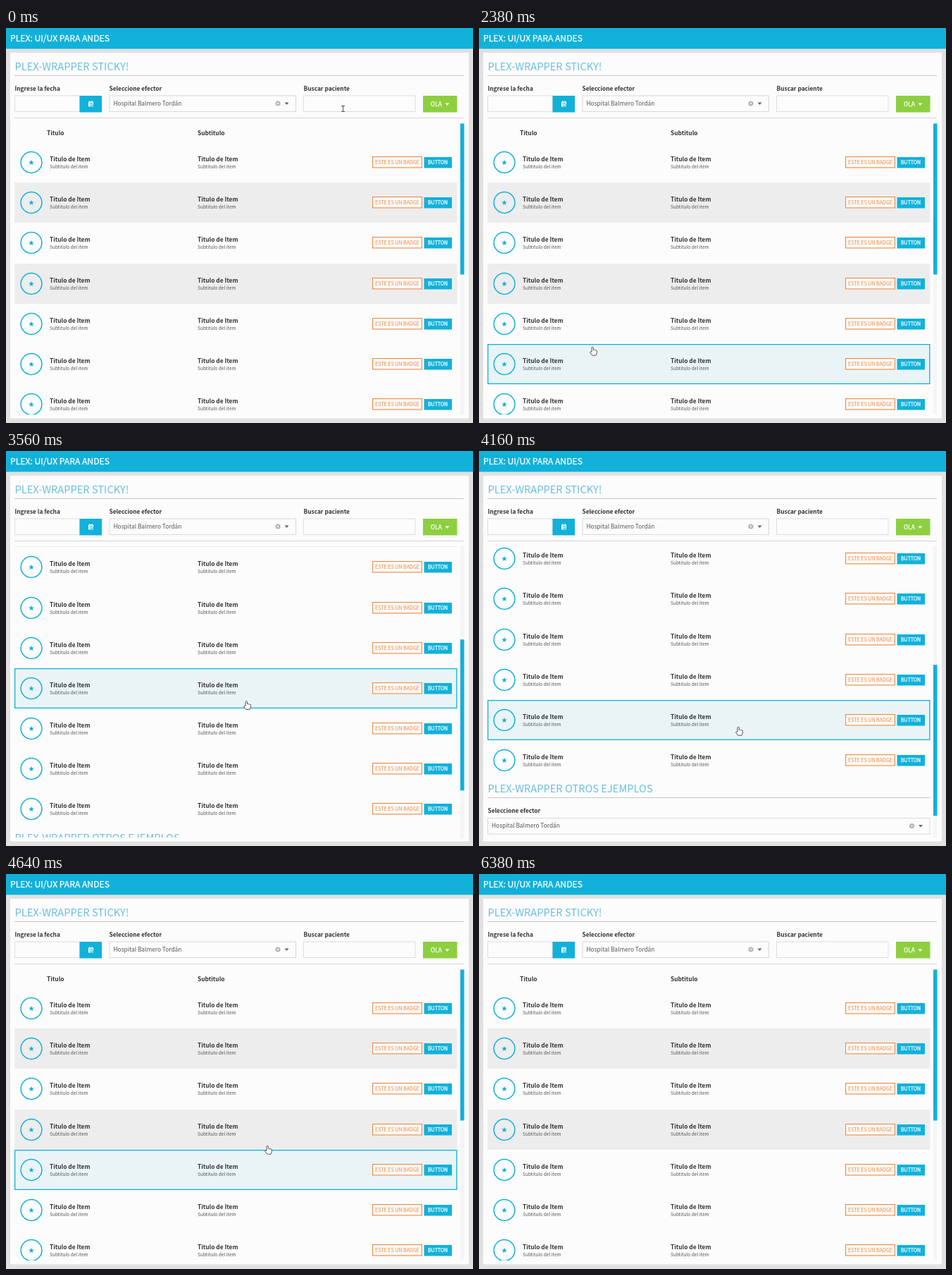
Write an HTML page with a canvas that moves like this. It is 663 by 560 pixels and loops after 6700 ms.

```html
<!DOCTYPE html>
<html lang="es">
<head>
<meta charset="utf-8">
<title>Plex wrapper</title>
<style>
html, body { margin: 0; width: 100%; height: 100%; overflow: hidden; background: #e1e1e1; }
canvas { display: block; width: 663px; height: 560px; }
</style>
</head>
<body>
<canvas id="stage"></canvas>
<script>
const W = 663, H = 560, LOOP = 6700;
const BLUE = '#11b1da', INK = '#333', GREY = '#555', ORANGE = '#e98a45', PANEL = '#fcfcfc';
const FAMILY = '"Noto Sans CJK JP", "Noto Sans CJK SC", "Noto Sans CJK", "Open Sans", sans-serif';
const HOSPITAL = 'Hospital Balmero Tordán';

const LIST = { left: 12, right: 640.5, top: 135, bottom: 548 };
const ROW = { top: 161.8, step: 57.15, count: 11 };
const THUMB = 214, MAX_SCROLL = 384;

// time, x, y of the pointer tip
const POINTER = [
  [0, 478, 110], [20, 478, 110], [340, 260, 106], [560, 30, 58], [700, 119, 52],
  [900, 156, 48], [1080, 122, 57], [1260, 155, 61], [1400, 142, 56],
  [1670, 151.5, 189], [2070, 156, 380], [2380, 161, 452], [2760, 190, 440],
  [3240, 268, 289], [3780, 368, 391], [4160, 368, 391], [4640, 371, 385],
  [4900, 392, 430], [5330, 480, 306], [5470, 500, 300], [5780, 500, 300], [6340, 664, 256]
];
// time, offset of the list
const SCROLL = [[3150, 0], [3240, 19.3], [3440, 150], [3770, MAX_SCROLL], [3990, MAX_SCROLL], [4160, 324], [4600, 0]];

const canvas = document.getElementById('stage');
const c = canvas.getContext('2d');
const ratio = window.devicePixelRatio || 1;
canvas.width = W * ratio;
canvas.height = H * ratio;

// Monotone cubic through the keys: flat at turns and rests
function track(keys, t, k) {
  const last = keys.length - 1;
  if (t <= keys[0][0]) return keys[0][k];
  if (t >= keys[last][0]) return keys[last][k];
  let i = 0;
  while (t >= keys[i + 1][0]) i++;
  const rate = n => (keys[n + 1][k] - keys[n][k]) / (keys[n + 1][0] - keys[n][0]);
  const slope = n => {
    if (n === 0 || n === last) return 0;
    const a = rate(n - 1), b = rate(n);
    return a * b > 0 ? 2 * a * b / (a + b) : 0;
  };
  const d = keys[i + 1][0] - keys[i][0], u = (t - keys[i][0]) / d, v = 1 - u;
  return keys[i][k] * v * v * (1 + 2 * u) + slope(i) * d * u * v * v
    + keys[i + 1][k] * u * u * (3 - 2 * u) - slope(i + 1) * d * u * u * v;
}

function text(str, x, y, size, color = INK, weight = 400) {
  c.font = `${weight} ${size}px ${FAMILY}`;
  c.fillStyle = color;
  c.fillText(str, x, y);
}

// White label, a little heavier than regular
function label(str, x, y, size) {
  text(str, x, y, size, '#fff');
  c.strokeStyle = '#fff';
  c.lineWidth = 0.25;
  c.strokeText(str, x, y);
}

function box(x, y, w, h, fill, stroke, line = 1) {
  if (fill) {
    c.fillStyle = fill;
    c.fillRect(x, y, w, h);
  }
  if (stroke) {
    c.strokeStyle = stroke;
    c.lineWidth = line;
    c.strokeRect(x + line / 2, y + line / 2, w - line, h - line);
  }
}

function poly(points, fill, stroke) {
  c.beginPath();
  points.forEach(([x, y]) => c.lineTo(x, y));
  c.closePath();
  if (fill) { c.fillStyle = fill; c.fill(); }
  if (stroke) { c.strokeStyle = stroke; c.lineWidth = 1; c.stroke(); }
}

function disc(x, y, r, fill) {
  c.beginPath();
  c.arc(x, y, r, 0, 7);
  c.fillStyle = fill;
  c.fill();
}

const caret = (x, y, color) => poly([[x - 3, y - 1.5], [x + 3, y - 1.5], [x, y + 2]], color);

function star(x, y, r) {
  const points = [];
  for (let i = 0; i < 10; i++) {
    const a = i * Math.PI / 5 - Math.PI / 2, d = i % 2 ? r * 0.42 : r;
    points.push([x + d * Math.cos(a), y + d * Math.sin(a)]);
  }
  poly(points, BLUE);
}

// The pale tint stands for a light weight
function heading(str, y, w) {
  text(str, 12.5, y, 14.65, '#6cbedc', 300);
  box(12, y + 7, w, 1, '#c6c6c6');
}

function select(x, y, w) {
  box(x, y, w, 23.5, PANEL, '#d9d9d9');
  text(HOSPITAL, x + 6, y + 14.3, 8.35, '#555');
  const cx = x + w - 26, cy = y + 11.5;
  disc(cx, cy, 3.6, '#b5b5b5');
  c.strokeStyle = PANEL;
  c.lineWidth = 0.9;
  c.beginPath();
  c.moveTo(cx - 1.3, cy - 1.3); c.lineTo(cx + 1.3, cy + 1.3);
  c.moveTo(cx + 1.3, cy - 1.3); c.lineTo(cx - 1.3, cy + 1.3);
  c.stroke();
  caret(x + w - 13.5, cy, '#666');
}

function calendar(x, y) {
  box(x - 3.5, y - 3, 7, 7, '#fff');
  box(x - 2.3, y - 4.2, 1.2, 1.6, '#fff');
  box(x + 1.1, y - 4.2, 1.2, 1.6, '#fff');
  box(x - 2.5, y - 1.4, 5, 0.7, BLUE);
  disc(x + 1.1, y + 1.7, 2, BLUE);
  disc(x + 1.1, y + 1.7, 1.1, '#fff');
}

function frame() {
  box(0, 0, W, H, '#e1e1e1');
  box(0, 0, W, 29.5, BLUE);
  label('PLEX: UI/UX PARA ANDES', 6, 18.8, 12.15);
  box(6, 35, 651, 518.5, PANEL);
}

function filters() {
  heading('PLEX-WRAPPER STICKY!', 60, 638);
  text('Ingrese la fecha', 12.5, 88.8, 8.35, INK, 700);
  text('Seleccione efector', 146.5, 88.8, 8.3, INK, 700);
  text('Buscar paciente', 422.5, 88.8, 8.35, INK, 700);
  box(12, 95.5, 93, 23.5, PANEL, '#dedede');
  box(104.5, 96, 31.5, 23.5, BLUE);
  calendar(120.5, 107.5);
  select(146.5, 95.5, 265.5);
  box(422, 95.5, 159.5, 23.5, PANEL, '#dedede');
  box(592, 96, 48.5, 23.5, '#8dcf40');
  label('OLA', 603, 110.6, 8.4);
  caret(626.5, 108, '#fff');
  box(12, 127, 638, 1, '#d6d6d6');
}

function drawRow(i, scroll, hot) {
  const y = Math.round(190.1 + ROW.step * i - scroll);
  if (y < LIST.top - 30 || y > LIST.bottom + 30) return;
  const w = LIST.right - LIST.left;
  if (hot) box(LIST.left, y - 28, w, 57, '#eaf4f7', BLUE, 1.3);
  else if (i === 1 || i === 3) box(LIST.left, y - 28, w, 57, '#ededed');

  c.beginPath();
  c.arc(36, y + 0.5, 14.9, 0, 7);
  c.strokeStyle = BLUE;
  c.lineWidth = 1.5;
  c.stroke();
  star(36, y + 0.8, 4.1);
  for (const x of [62, 272]) {
    text('Titulo de Item', x, y - 1, 8.35, INK, 700);
    text('Subtitulo del item', x, y + 9, 6.55, GREY);
  }
  box(520, y - 8, 71, 16.5, '#fdf9f6', ORANGE, 1.1);
  text('ESTE ES UN BADGE', 524, y + 3, 7.1, ORANGE);
  box(593.5, y - 7, 39.5, 15.5, BLUE);
  label('BUTTON', 599, y + 3.4, 7);
}

function list(scroll, hot) {
  c.save();
  c.beginPath();
  c.rect(LIST.left - 1, LIST.top, LIST.right - LIST.left + 2, LIST.bottom - LIST.top);
  c.clip();
  const s = Math.round(scroll);
  text('Titulo', 58, 151.6 - s, 8.4, INK, 700);
  text('Subtitulo', 272, 151.6 - s, 8.4, INK, 700);
  for (let i = 0; i < ROW.count; i++) drawRow(i, scroll, i === hot);
  heading('PLEX-WRAPPER OTROS EJEMPLOS', 808 - s, 628.5);
  text('Seleccione efector', 12.5, 837 - s, 8.3, INK, 700);
  select(12, 844 - s, 628.5);
  c.restore();

  box(645, LIST.top, 5.5, LIST.bottom - LIST.top, '#f5f5f5');
  const run = LIST.bottom - LIST.top - THUMB;
  box(645, LIST.top + 0.5 + run * scroll / MAX_SCROLL, 5.5, THUMB, BLUE);
}

function hand(x, y) {
  c.save();
  c.translate(x, y);
  c.beginPath();
  c.moveTo(-1, 7);
  c.lineTo(-1, 1);
  c.quadraticCurveTo(0.2, -1, 1.3, 1);
  c.lineTo(1.3, 4.4);
  c.quadraticCurveTo(2.6, 3.4, 3.2, 4.8);
  c.quadraticCurveTo(4.5, 4, 5, 5.2);
  c.quadraticCurveTo(6.4, 4.7, 6.4, 6.2);
  c.lineTo(6.2, 9);
  c.lineTo(5, 12.2);
  c.lineTo(-0.4, 12.2);
  c.lineTo(-3.6, 7.6);
  c.quadraticCurveTo(-3.2, 5.8, -1, 7.6);
  c.fillStyle = '#fff';
  c.fill();
  c.strokeStyle = '#444';
  c.lineWidth = 0.9;
  c.lineJoin = 'round';
  c.stroke();
  c.restore();
}

function beam(x, y) {
  c.strokeStyle = '#555';
  c.lineWidth = 1;
  c.beginPath();
  c.moveTo(x - 2, y + 0.5); c.lineTo(x + 3, y + 0.5);
  c.moveTo(x + 0.5, y + 0.5); c.lineTo(x + 0.5, y + 8.5);
  c.moveTo(x - 2, y + 8.5); c.lineTo(x + 3, y + 8.5);
  c.stroke();
}

function arrow(x, y) {
  const shape = [[0, 0], [0, 10], [2.4, 7.8], [4, 11.4], [5.6, 10.7], [4, 7.2], [7.2, 7]];
  poly(shape.map(([a, b]) => [x + a, y + b]), '#fff', '#333');
}

function rowAt(x, y, scroll) {
  if (x < LIST.left || x > LIST.right || y < LIST.top || y > LIST.bottom) return -1;
  const i = Math.floor((y + scroll - ROW.top) / ROW.step);
  return i < ROW.count ? i : -1;
}

function pointer(x, y, hot) {
  const within = (l, t, r, b) => x > l && x < r && y > t && y < b;
  if (hot >= 0) hand(x, y);
  else if (within(422, 92, 581, 116) || within(12, 42, 174, 64)) beam(x, y);
  else arrow(x, y);
}

function draw(t) {
  const scroll = track(SCROLL, t, 1);
  const x = track(POINTER, t, 1), y = track(POINTER, t, 2);
  const hot = rowAt(x, y + 6, scroll);
  c.setTransform(ratio, 0, 0, ratio, 0, 0);
  frame();
  filters();
  list(scroll, hot);
  if (x < W) pointer(x, y, hot);
}

const start = performance.now();
function tick() {
  draw((performance.now() - start) % LOOP);
  requestAnimationFrame(tick);
}
tick();
</script>
</body>
</html>
```
